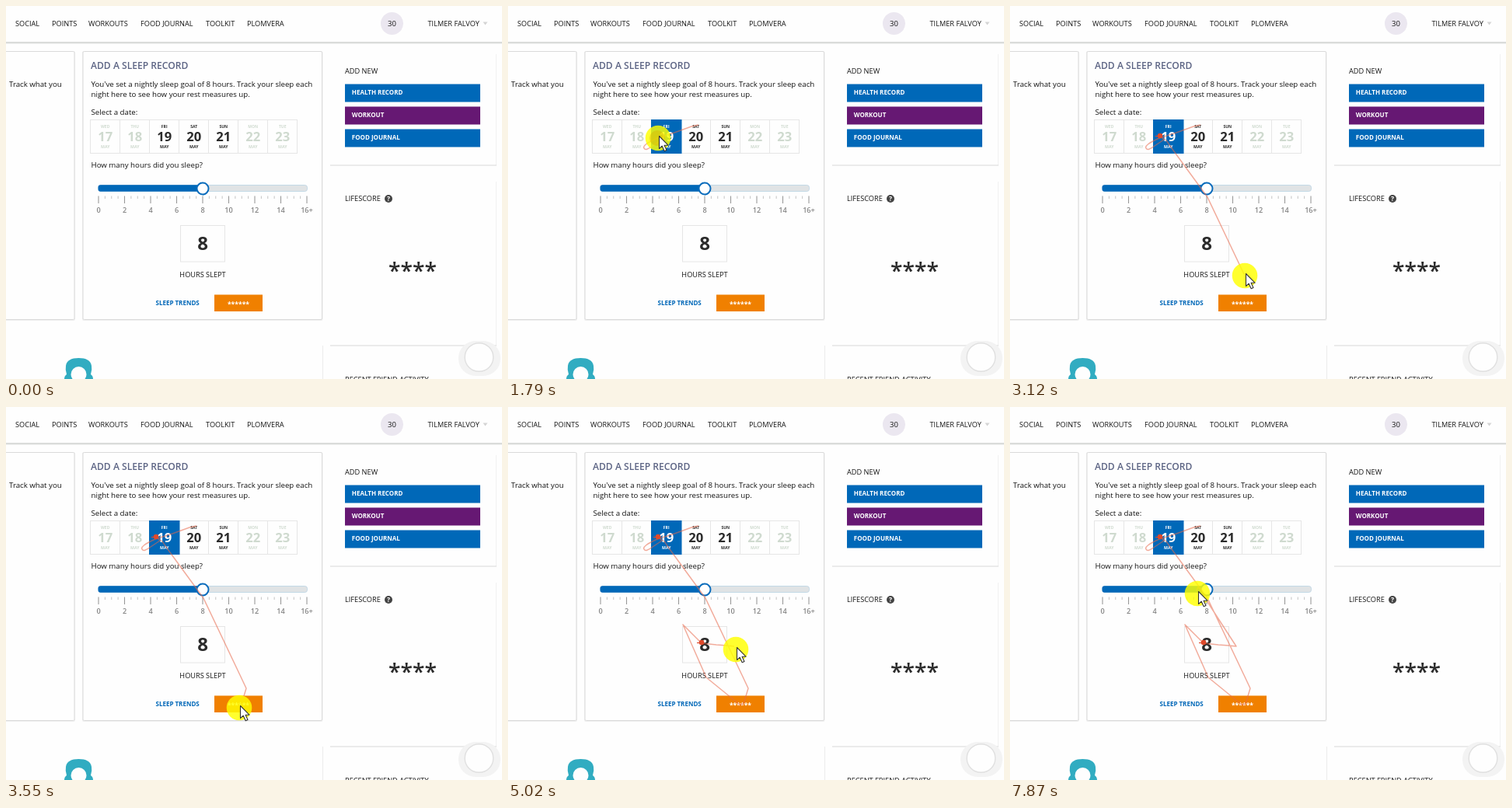
Write an HTML page that moves like this. It is 638 px wide and 480 px high and loops after 8 s.

```html
<!DOCTYPE html>
<html lang="en">
<head>
<meta charset="utf-8">
<title>Sleep record</title>
<style>
html, body { margin: 0; width: 100%; height: 100%; overflow: hidden; background: #fff; }
svg { display: block; width: 100%; height: 100%; font-family: "Open Sans", "Noto Sans", sans-serif; }
</style>
</head>
<body>
<svg id="stage" viewBox="0 0 638 480" xmlns="http://www.w3.org/2000/svg"></svg>
<script>
const NS = 'http://www.w3.org/2000/svg';
const LOOP = 8000;
const stage = document.getElementById('stage');
const BLUE = '#0068b8', INK = '#141414', DARK = '#2b2b2b', PALE = '#cfdacf';

function add(tag, attrs, parent = stage) {
  const el = document.createElementNS(NS, tag);
  for (const k in attrs) el.setAttribute(k, attrs[k]);
  parent.appendChild(el);
  return el;
}
const rect = (x, y, width, height, fill, more = {}) =>
  add('rect', { x, y, width, height, fill, ...more });
const line = (x1, y1, x2, y2, stroke, w = 1) =>
  add('line', { x1, y1, x2, y2, stroke, 'stroke-width': w });
const circle = (cx, cy, r, fill, more = {}) => add('circle', { cx, cy, r, fill, ...more });
function text(x, y, str, size, fill = INK, weight = 400, anchor = 'start') {
  const el = add('text', { x, y, 'font-size': size, fill, 'font-weight': weight, 'text-anchor': anchor });
  el.textContent = str;
  return el;
}
function card(x, y, w, h) {
  rect(x - 1, y - .5, w + 2, h + 2, '#f0f0f0', { rx: 2 });
  rect(x, y, w, h, '#fefefe', { rx: 1.5, stroke: '#dadada' });
}

// Header
rect(0, 0, 638, 480, '#fefefe');
rect(0, 46, 638, 2.4, '#dadcda');
[[12, 'SOCIAL'], [59, 'POINTS'], [106, 'WORKOUTS'], [173, 'FOOD JOURNAL'], [257, 'TOOLKIT'], [310, 'PLOMVERA']]
  .forEach(([x, s]) => text(x, 25.5, s, 9.2));
circle(496.5, 22.5, 14.5, '#ebe7f0');
text(496.5, 26, '30', 9.5, INK, 400, 'middle');
text(542.5, 25.5, 'TILMER FALVOY', 9.2);
add('path', { d: 'M613.5 20.500h6l-3 4z', fill: '#d4d4d4' });

// Main cards
card(-10, 58.5, 98, 345);
text(4, 104, 'Track what you', 9.7);
card(99, 58.5, 307.5, 345);
text(109, 81, 'ADD A SLEEP RECORD', 12.1, '#5c6484', 600);
text(109.5, 104, "You've set a nightly sleep goal of 8 hours. Track your sleep each", 9.7);
text(109.5, 117, 'night here to see how your rest measures up.', 9.7);
text(109.5, 140, 'Select a date:', 9.7);
text(109.5, 208, 'How many hours did you sleep?', 9.7);

// Days
const DAYS = ['WED', 'THU', 'FRI', 'SAT', 'SUN', 'MON', 'TUE'];
DAYS.forEach((_, i) => rect(108.5 + i * 38, 146.5, 38, 43, '#fefefe', { stroke: '#e6e6e6' }));
const chosen = rect(184, 146, 39.5, 44, BLUE);
const labels = DAYS.map((name, i) => {
  const x = 127.7 + i * 38, color = i > 1 && i < 5 ? DARK : PALE;
  return [
    text(x, 157, name, 5, color, 700, 'middle'),
    text(x, 174, 17 + i, 16.6, color, 700, 'middle'),
    text(x, 183, 'MAY', 5.2, color, 700, 'middle')
  ];
});

// Slider
rect(119, 230.5, 268.5, 8, '#e0e3e5', { rx: 3, stroke: '#b9d3e4', 'stroke-width': .8 });
rect(118.5, 230.3, 134, 8.5, BLUE, { rx: 3 });
circle(253, 235, 7.5, '#fff', { stroke: '#0a6cbc', 'stroke-width': 2 });
for (let i = 0; i <= 32; i++) {
  const x = 119 + i * 8.375, major = i % 4 === 0;
  line(x, 244.5, x, major ? 254 : 248, major ? '#999' : '#b5b5b5', major ? 1.1 : .8);
  if (major) text(x, 266, i === 32 ? '16+' : i / 2, 9.2, '#858585', 600, 'middle');
}

rect(224.5, 282.5, 57, 46.5, '#fefefe', { stroke: '#e6e6e6' });
text(253, 314, '8', 24, DARK, 700, 'middle');
text(253, 349, 'HOURS SLEPT', 9.2, INK, 400, 'middle');
text(192.5, 385.3, 'SLEEP TRENDS', 8, BLUE, 700);
rect(268, 371.5, 62, 21.5, '#f08000');
text(299, 387, '******', 8.6, '#fff', 700, 'middle');

// Sidebar
function panel(y, h) {
  rect(417, y, 214, h, '#fefefe');
  line(630.5, y + 4, 630.5, y + h, '#f1f1f1');
  line(417, y + h, 631, y + h, '#e4e4e4', 1.4);
}
panel(58, 147);
text(436, 87, 'ADD NEW', 9.2);
[['HEALTH RECORD', BLUE], ['WORKOUT', '#661873'], ['FOOD JOURNAL', BLUE]].forEach(([s, fill], i) => {
  const y = 100.5 + i * 29;
  rect(436, y, 174, 23, fill);
  text(444.8, y + 13.8, s, 8, '#fff', 700);
});
panel(222, 215);
text(436, 251.3, 'LIFESCORE', 9.2);
circle(492, 248, 5, '#444');
text(492, 251, '?', 8.5, '#fff', 700, 'middle');
text(523, 351, '****', 28.2, DARK, 600, 'middle');
line(407.5, 437, 407.5, 480, '#ececec');
text(436, 484, 'RECENT FRIEND ACTIVITY', 9.2);

// Avatar and floating button
add('path', {
  d: 'M75 480Q75 476 78 474Q76 468 77 463C78 456 84 453 93.500 453S109 456 110 463Q111 468 109 474Q112 476 112 480Z',
  fill: '#31acc1'
});
circle(93.5, 474, 10, '#fefefe');
rect(582, 431, 54, 45, '#f3f3f3', { rx: 22 });
circle(608.5, 452, 18.3, '#fefefe', { stroke: '#e0e0e0', 'stroke-width': 1.4 });

// Pointer: time, x, y of the highlight centre
const steps = [
  [900, 245, 102], [1050, 246, 156], [1200, 216, 165], [1340, 178, 187], [1490, 188, 180],
  [1640, 193, 170], [2090, 200, 174], [2530, 202, 175], [2680, 203, 176],
  [2970, 255, 253], [3120, 302, 347], [3260, 304, 386], [3410, 300, 387], [3560, 257, 351],
  [3700, 227, 283], [3850, 238, 295], [4000, 246, 305], [4140, 248, 308],
  [4580, 256, 308], [4730, 270, 310], [4880, 284, 311], [5020, 293, 312],
  [7420, 259, 260], [7570, 249, 244], [7720, 243, 232], [7870, 241, 240]
];
// Trail pieces, each shown from its time on
const trail = [
  [1200, 'M245 153L236 155L214 163'], [1340, 'L192 170Q172 179 175 183'],
  [1490, 'Q177 187 186 180'], [1640, 'L198 172L193 167'], [2090, 'L198 171'],
  [2530, 'L201 173'], [2970, 'L208 183L254 246'], [3120, 'L301 345'],
  [3260, 'L309 362L303 382'], [3410, 'L298 383'], [3560, 'L255 348'],
  [3700, 'L225 280'], [3850, 'L236 291'], [4000, 'L244 299'], [4140, 'L249 304'],
  [4730, 'L268 306'], [4880, 'L282 307'], [5020, 'L291 308'],
  [7420, 'L258 257'], [7570, 'L248 241'], [7720, 'L242 231'], [7870, 'L240 237']
];
const track = add('path', {
  fill: 'none', stroke: '#e8694c', 'stroke-opacity': .55, 'stroke-width': 1.5, 'stroke-linejoin': 'round'
});
const marks = [[1940, 193, 167], [4290, 249, 303]].map(([t, x, y]) => {
  const g = add('g', {});
  add('path', { d: `M${x - 6} ${y + .5}H${x}`, stroke: '#df4a2c', 'stroke-width': 1.2 }, g);
  add('circle', { cx: x, cy: y, r: 3.3, fill: '#df4a2c' }, g);
  return [t, g];
});
const pointer = add('g', {});
add('circle', { r: 16.3, fill: '#ffff00', 'fill-opacity': .82 }, pointer);
const press = add('circle', { cx: -1, r: 10, fill: '#d9b400', 'fill-opacity': .45 }, pointer);
add('path', {
  d: 'M1.500 -2.500V13.500L5.200 10.200L8.200 16.800L11 15.500L8.100 9.200H13Z',
  fill: '#fff', stroke: '#333', 'stroke-width': 1.1, 'stroke-linejoin': 'round'
}, pointer);

const show = (el, on) => el.setAttribute('visibility', on ? 'visible' : 'hidden');
function render(t) {
  const past = steps.filter(s => s[0] <= t);
  show(pointer, past.length);
  if (past.length) {
    const [, x, y] = past[past.length - 1];
    pointer.setAttribute('transform', `translate(${x} ${y})`);
  }
  track.setAttribute('d', trail.filter(p => p[0] <= t).map(p => p[1]).join(''));
  marks.forEach(([at, el]) => show(el, t >= at));
  show(press, (t >= 1790 && t < 1940) || (t >= 4140 && t < 4290));
  const picked = t >= 1790;
  show(chosen, picked);
  labels[2].forEach(el => el.setAttribute('fill', picked ? '#fff' : DARK));
}

const start = performance.now();
function tick(now) {
  render(Math.max(0, now - start) % LOOP);
  requestAnimationFrame(tick);
}
render(0);
requestAnimationFrame(tick);
</script>
</body>
</html>
```
